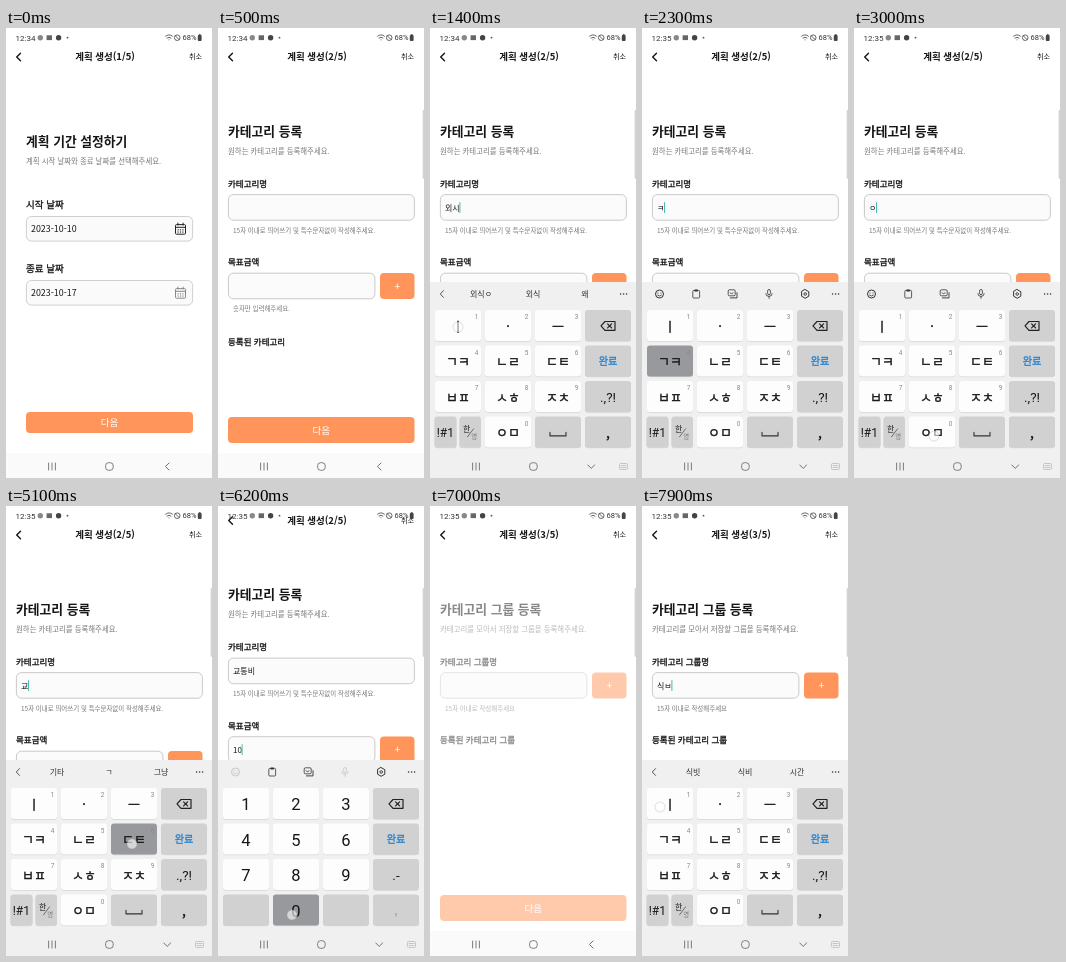
An HTML page for the animation above (8000 ms loop, 206 px wide and 450 px high).

```html
<!DOCTYPE html>
<html lang="ko">
<head>
<meta charset="utf-8">
<title>계획 생성</title>
<style>
html, body { margin: 0; width: 100%; height: 100%; overflow: hidden; background: #fff; }
svg { display: block; width: 100vw; height: 100vh; font-family: "Noto Sans CJK KR", "Noto Sans CJK", "Noto Sans", sans-serif; }
.num { font-family: Roboto, "Noto Sans", sans-serif; }
.line { fill: none; stroke: #333; stroke-width: 1; stroke-linecap: round; stroke-linejoin: round; }
</style>
</head>
<body>
<svg id="stage" viewBox="0 0 206 450"></svg>
<script>
const LOOP = 8000, STEP = 100, ORANGE = '#ff955b', DARK = '#161616';
const KB_BG = '#f0f0f1', KEY_GRAY = '#d1d1d2';

// Each entry changes the state; tap, touch, fade and dim last for one entry only.
const story = [
  [0, { page: 1, clock: '12:34', kb: 0, num: 0, focus: '', name: '', sum: '', chips: 0, words: '' }],
  [200, { tap: 'next' }],
  [300, { page: 2, fade: .5 }],
  [400, {}],
  [800, { focus: 'name' }],
  [900, { kb: .6 }],
  [1000, { kb: 1, name: 'ㅇ', tap: 13 }],
  [1100, { name: '오', tap: 2 }],
  [1200, { name: '외', tap: 0, words: '외 왜 외식' }],
  [1300, { name: '외ㅅ', tap: 9 }],
  [1400, { name: '외시', touch: [28, 299], words: '외식ㅇ 외식 왜' }],
  [1500, { name: '외식', tap: 4, words: '외식 외식을 외식은' }],
  [1600, { num: 1, focus: 'sum', words: '' }],
  [1700, { sum: '100', tap: 13 }],
  [1800, { sum: '100000', tap: 13 }],
  [1900, { kb: .4, num: 0, focus: '' }],
  [2000, { kb: 0, tap: 'add' }],
  [2100, { chips: 1, name: '', sum: '' }],
  [2200, { kb: .6, focus: 'name' }],
  [2300, { kb: 1, name: 'ㅋ', tap: 4, clock: '12:35' }],
  [2400, { name: '카페', tap: 0, words: '카페 카페에 카페는' }],
  [2500, { num: 1, focus: 'sum', sum: '30', tap: 13, words: '' }],
  [2600, { sum: '30000', tap: 13 }],
  [2700, { kb: 0, num: 0, focus: '', tap: 'add' }],
  [2800, { chips: 2, name: '', sum: '' }],
  [2900, { kb: .7, focus: 'name' }],
  [3000, { kb: 1, name: 'ㅇ', touch: [80, 408] }],
  [3100, { name: '어', tap: 1, words: '어 어제 어디' }],
  [3200, { name: '여', tap: 0, words: '여 여기 여자' }],
  [3300, { name: '역', tap: 4, words: '역 역시 여기' }],
  [3400, { name: '여기', tap: 0, words: '여기 여기서 여기는' }],
  [3500, { name: '여가', tap: 1, words: '여가 여가를 여가는' }],
  [3600, {}],
  [3700, { num: 1, focus: 'sum', words: '' }],
  [3800, { sum: '5', tap: 5 }],
  [3900, { sum: '50', tap: 13 }],
  [4000, { sum: '500', tap: 13 }],
  [4100, { sum: '50000', tap: 13 }],
  [4200, { kb: .4, num: 0, focus: '' }],
  [4300, { kb: 0, dim: 1 }],
  [4400, { tap: 'add' }],
  [4500, { chips: 3, name: '', sum: '' }],
  [4600, { kb: .6, focus: 'name' }],
  [4700, { kb: 1 }],
  [4800, { name: 'ㄱ', tap: 4, words: '그 ㄱ 그냥' }],
  [4900, { name: 'ㄱ', tap: 1 }],
  [5000, { name: '교', tap: 2, words: '기타 ㄱ 그냥' }],
  [5100, { tap: 6, touch: [126, 338] }],
  [5200, { name: '굩', tap: 6, words: '교 교통 교회' }],
  [5300, { name: '교토', tap: 2, words: '교통 교토 교통비' }],
  [5400, { name: '교통', tap: 13 }],
  [5500, { name: '교통ㅂ', tap: 8, words: '교통비 교통 교통편' }],
  [5600, { name: '교통비', tap: 0 }],
  [5800, { num: 1, focus: 'sum', words: '' }],
  [6100, { sum: '1', tap: 0 }],
  [6200, { sum: '10', tap: 13, touch: [74, 409] }],
  [6300, { sum: '1000', tap: 13 }],
  [6400, { sum: '100000', tap: 13 }],
  [6500, { kb: 0, num: 0, focus: '', tap: 'add' }],
  [6600, { chips: 4, name: '', sum: '' }],
  [6700, { tap: 'next' }],
  [7000, { page: 3, fade: .5 }],
  [7100, {}],
  [7300, { focus: 'name' }],
  [7400, { kb: .6 }],
  [7500, { kb: 1, name: 'ㅅ', tap: 9 }],
  [7600, { name: '시', tap: 0, words: '시 시간 시작' }],
  [7700, { name: '식', tap: 4, words: '식 식사 식당' }],
  [7800, { name: '식', tap: 8 }],
  [7900, { name: '식ㅂ', touch: [18, 301], words: '식빗 식비 시간' }]
];

function stateAt(t) {
  let s = {};
  for (const [at, change] of story) {
    if (at > t) break;
    s = { ...s, tap: null, touch: null, fade: 1, dim: 0, ...change };
  }
  return s;
}

// "heavy" thickens regular glyphs to a medium weight.
const text = (str, x, y, size, o = {}) =>
  `<text x="${x}" y="${y + size * .37}" font-size="${size}" fill="${o.fill || DARK}" stroke="${o.fill || DARK}" stroke-width="${o.heavy || 0}" font-weight="${o.w || 400}" text-anchor="${o.mid ? 'middle' : 'start'}" class="${o.cls || ''}" opacity="${o.op ?? 1}">${str}</text>`;
const box = (x, y, w, h, r, fill, stroke = 'none') =>
  `<rect x="${x}" y="${y}" width="${w}" height="${h}" rx="${r}" fill="${fill}" stroke="${stroke}" stroke-width=".8"/>`;
const line = (d, color = '#333', w = 1) => `<path class="line" d="${d}" style="stroke:${color};stroke-width:${w}"/>`;
const ring = (x, y, r, color = '#333', w = 1) => `<circle cx="${x}" cy="${y}" r="${r}" fill="none" stroke="${color}" stroke-width="${w}"/>`;
const dot = (x, y, r, fill) => `<circle cx="${x}" cy="${y}" r="${r}" fill="${fill}"/>`;
const shift = (dy, body, op = 1) => `<g transform="translate(0 ${dy})" opacity="${op}">${body}</g>`;
const label = (str, y) => text(str, 10, y + .4, 8.5, { heavy: .3 });
const hint = (str, y) => text(str, 15, y, 6.45, { fill: '#777' });

const textWidth = (str, size) =>
  [...str].reduce((w, c) => w + (c >= '0' && c <= '9' ? .555 : .92), 0) * size;

function field(str, y, w, focused) {
  let out = box(10.4, y, w, 25.6, 5, '#fbfbfb', '#bdbdbd') + text(str, 15, y + 13.2, 8);
  if (focused) {
    const x = 15.2 + textWidth(str, 8);
    out += line(`M${x} ${y + 8}v10`, '#45b9aa', 1);
  }
  return out;
}

const addButton = (y, s) =>
  box(162, y, 34.5, 26, 4, s.tap === 'add' ? '#e9763b' : ORANGE) + text('+', 179.3, y + 13, 9.5, { fill: '#fff', mid: 1, heavy: .2 });

const nextButton = (x, y, w, h, s) =>
  box(x, y, w, h, 4, s.tap === 'next' ? '#e9763b' : ORANGE) +
  text('다음', x + w / 2, y + h / 2, 9.6, { fill: '#fff', mid: 1, op: s.dim ? .55 : 1 });

const header = n =>
  line('M14.5 25.2l-3.8 3.8l3.8 3.8', DARK, 1.4) +
  text(`계획 생성(${n}/5)`, 99, 28.8, 9.5, { w: 700, mid: 1 }) +
  text('취소', 189.5, 28.8, 7.1, { mid: 1 });

const intro = (x, y, title, sub) =>
  text(title, x, y, 12.8, { w: 700 }) + text(sub, x, y + 20, 7.42, { fill: '#777' });

function calendar(x, y, c) {
  let out = `<rect x="${x - 5}" y="${y - 4.5}" width="10" height="9.6" rx="1" fill="none" stroke="${c}"/>` +
    line(`M${x - 5} ${y - 1.8}h10M${x - 2.6} ${y - 6}v2M${x + 2.6} ${y - 6}v2`, c);
  for (let i = 0; i < 6; i++) out += box(x - 3 + i % 3 * 2.4, y + .2 + (i > 2 ? 2.2 : 0), 1.2, 1.1, 0, c);
  return out;
}

function dateField(name, date, y, c) {
  return text(name, 20, y - 24, 9.5, { heavy: .3 }) + box(20.4, y - 12, 166.2, 24.6, 5, '#fafafa', '#c4c4c4') +
    text(date, 25, y, 8.9) + calendar(174.5, y + .6, c);
}

const periodPage = s =>
  intro(20, 113, '계획 기간 설정하기', '계획 시작 날짜와 종료 날짜를 선택해주세요.') +
  dateField('시작 날짜', '2023-10-10', 200.5, '#222') +
  dateField('종료 날짜', '2023-10-17', 264.5, '#888') +
  nextButton(20, 384, 167, 21, s);

const chipData = [['외식 100,000원', 56], ['카페 30,000원', 48], ['여가 50,000원', 48], ['교통비 100,000원', 62]];

function chipRow(list, y) {
  let x = 100 - (list.reduce((a, c) => a + c[1] + 2, -2)) / 2, out = '';
  for (const [str, w] of list) {
    out += box(x, y - 9, w, 18, 4, '#fdfdfd', '#ededed') + text(str, x + w / 2, y, 6.7, { mid: 1 });
    x += w + 2;
  }
  return out;
}

function categoryPage(s) {
  const chips = chipData.slice(0, s.chips);
  return intro(10, 103, '카테고리 등록', '원하는 카테고리를 등록해주세요.') +
    label('카테고리명', 155) + field(s.name, 166.6, 186, s.focus === 'name') +
    hint('15자 이내로 띄어쓰기 및 특수문자없이 작성해주세요.', 202.5) +
    label('목표금액', 233.6) + field(s.sum, 245.2, 146.5, s.focus === 'sum') + addButton(245, s) +
    hint('숫자만 입력해주세요.', 281) + label('등록된 카테고리', 313) +
    chipRow(chips.slice(0, 3), 336) + chipRow(chips.slice(3), 357) +
    nextButton(10, 389, 186.5, 26, s);
}

const groupPage = s =>
  intro(10, 103, '카테고리 그룹 등록', '카테고리를 모아서 저장할 그룹을 등록해주세요.') +
  label('카테고리 그룹명', 155) + field(s.name, 166.6, 146.5, s.focus === 'name') + addButton(166.4, s) +
  hint('15자 이내로 작성해주세요', 202.5) + label('등록된 카테고리 그룹', 233.6) +
  nextButton(10, 389, 186.5, 26, s);

const pages = [periodPage, categoryPage, groupPage];

function statusBar(clock) {
  return text(clock, 9.6, 9.7, 8, { cls: 'num', fill: '#333' }) +
    dot(34.3, 9.7, 2.7, '#888') + box(40.6, 7.3, 5.4, 4.8, 0, '#666') + dot(52.6, 9.7, 2.7, '#444') + dot(61.5, 9.7, .9, '#555') +
    line('M159.6 8.2q3.4-2.8 6.8 0M161 10q2-1.6 4 0M163 11.8v.1', '#555', .9) +
    ring(171.2, 9.7, 2.8, '#555', .9) + line('M169.3 7.8l3.8 3.8', '#555', .9) +
    text('68%', 176.5, 9.7, 7.5, { cls: 'num', fill: '#333' }) +
    box(191.8, 7, 3.8, 6, 1, '#444') + box(192.8, 6.2, 1.8, 1, 0, '#444');
}

function navBar(open) {
  const c = '#707070';
  let out = box(0, 425, 206, 25, 0, open ? KB_BG : '#fafafa') +
    line('M42.6 435v7M46 435v7M49.4 435v7', c, .9) +
    `<rect x="99.6" y="434.7" width="7.6" height="7.6" rx="3" fill="none" stroke="${c}" stroke-width=".9"/>`;
  if (!open) return out + line('M163 435l-3.6 3.5l3.6 3.5', c, 1);
  out += line('M157.8 437l3.4 3.4l3.4-3.4', c, 1) + box(189.5, 435.5, 8, 6, 1, 'none', '#bbb');
  return out + line('M191 437.5h5M191 439.5h5', '#bbb', .8);
}

function toolbar(s) {
  const more = dot(190.6, 266, .8, '#333') + dot(193.6, 266, .8, '#333') + dot(196.6, 266, .8, '#333');
  if (s.words) {
    return more + line('M13.5 262.6l-3.2 3.4l3.2 3.4', '#555', 1) +
      s.words.split(' ').map((w, i) => text(w, 51 + i * 52, 266, 8, { mid: 1, fill: '#333' })).join('');
  }
  const off = s.num ? .22 : 1;
  const smile = ring(17.5, 266, 4) + dot(16, 265, .6, '#333') + dot(19, 265, .6, '#333') + line('M15.6 267.2q1.9 1.9 3.8 0', '#333', .8);
  const clip = box(50.8, 262.4, 6.8, 7.6, 1, 'none', '#333') + box(52.5, 261.4, 3.4, 2.2, .5, '#333');
  const sticker = box(86.2, 261.8, 7, 6, 1.2, 'none', '#333') + line('M88.4 269.9h6.6v-5.2', '#333', .9) + line('M88 265q1.6 1.6 3.2 0', '#333', .8);
  const mic = box(125.6, 261.5, 2.8, 5.2, 1.4, 'none', '#333') + line('M123.8 265.6q0 2.8 3.2 2.8t3.2-2.8M127 268.6v1.8', '#333', .8);
  const gear = line('M163.2 261.6l3.6 2.1v4.5l-3.6 2.1l-3.6-2.1v-4.5z', '#333', 1) + ring(163.2, 266, 1.3, '#333', .9);
  return more + shift(0, smile + mic, off) + clip + sticker + gear;
}

const letters = ['ㅣ', '·', 'ㅡ', '', 'ㄱㅋ', 'ㄴㄹ', 'ㄷㅌ', '', 'ㅂㅍ', 'ㅅㅎ', 'ㅈㅊ', '', '', 'ㅇㅁ', '', ','];
const digitOf = i => i === 13 ? 0 : i < 12 && i % 4 < 3 ? (i >> 2) * 3 + i % 4 + 1 : '';

function keyCap(i, s) {
  const x = 5 + i % 4 * 50, y = 282 + (i >> 2) * 35.5, cx = x + 23, cy = y + 15.9;
  const digit = digitOf(i), pressed = s.tap === i;
  const cap = (x, w, fill) => box(x, y + .8, w, 31, 3, '#d6d6d8') + box(x, y, w, 31, 3, fill);
  if (i === 12 && !s.num) {
    return cap(4.5, 22, KEY_GRAY) + cap(29.5, 21.5, KEY_GRAY) +
      text('!#1', 15.3, cy, 12, { mid: 1, cls: 'num' }) + text('한', 36.8, cy - 3.6, 8, { mid: 1 }) +
      line(`M37.5 ${cy + 4.5}l6-8`, '#555', .8) + text('영', 44.3, cy + 4.6, 6.4, { mid: 1, fill: '#777' });
  }
  let out = cap(x, 46, pressed ? '#98999c' : digit === '' ? KEY_GRAY : '#fdfdfd');
  if (i === 3) {
    return out + line(`M${cx - 7} ${cy}l4-4.4h10v8.8h-10z`, '#222', 1.2) + line(`M${cx - .4} ${cy - 2}l4 4m0-4l-4 4`, '#222', 1.2);
  }
  if (i === 7) return out + text('완료', cx, cy, 10.2, { mid: 1, fill: '#1f7fd0', heavy: .3 });
  if (i === 11) return out + text(s.num ? '.-' : '.,?!', cx, cy, 13.5, { mid: 1, cls: 'num' });
  if (s.num) {
    return out + (digit !== '' ? text(digit, cx, cy, 16.5, { mid: 1, cls: 'num' }) :
      i === 15 ? text(',', cx, cy, 12, { mid: 1, fill: '#999' }) : '');
  }
  if (i === 14) return out + line(`M${cx - 8} ${cy}v3.5h16v-3.5`, '#333', 1.1);
  out += text(letters[i], cx, cy, i === 15 ? 14 : 13, { mid: 1, heavy: .35 });
  return out + (digit !== '' ? text(digit, x + 41.5, y + 7, 6.4, { mid: 1, cls: 'num', fill: '#888' }) : '');
}

function keyboard(s) {
  let out = box(0, 254, 206, 172, 0, KB_BG) + toolbar(s);
  for (let i = 0; i < 16; i++) out += keyCap(i, s);
  if (s.touch) {
    const [x, y] = s.touch;
    out += `<circle cx="${x}" cy="${y}" r="5" fill="#fff" fill-opacity=".6" stroke="#999" stroke-opacity=".4" stroke-width=".8"/>`;
  }
  return out;
}

function scene(s) {
  const pan = s.num ? -14.5 : 0;
  return box(0, 0, 206, 450, 0, '#fff') +
    shift(pan, header(s.page) + shift(0, pages[s.page - 1](s), s.fade)) +
    (s.page > 1 ? box(204.6, 82, 3, 69, 1.4, '#d3d4d6') : '') +
    statusBar(s.clock) +
    (s.kb ? shift((1 - s.kb) * 171, keyboard(s)) : '') +
    navBar(s.kb > 0);
}

const stage = document.getElementById('stage');
const start = performance.now();
let shown = -1;

function tick() {
  const t = Math.floor((performance.now() - start) % LOOP / STEP) * STEP;
  if (t !== shown) {
    stage.innerHTML = scene(stateAt(t));
    shown = t;
  }
  requestAnimationFrame(tick);
}
tick();
</script>
</body>
</html>
```
